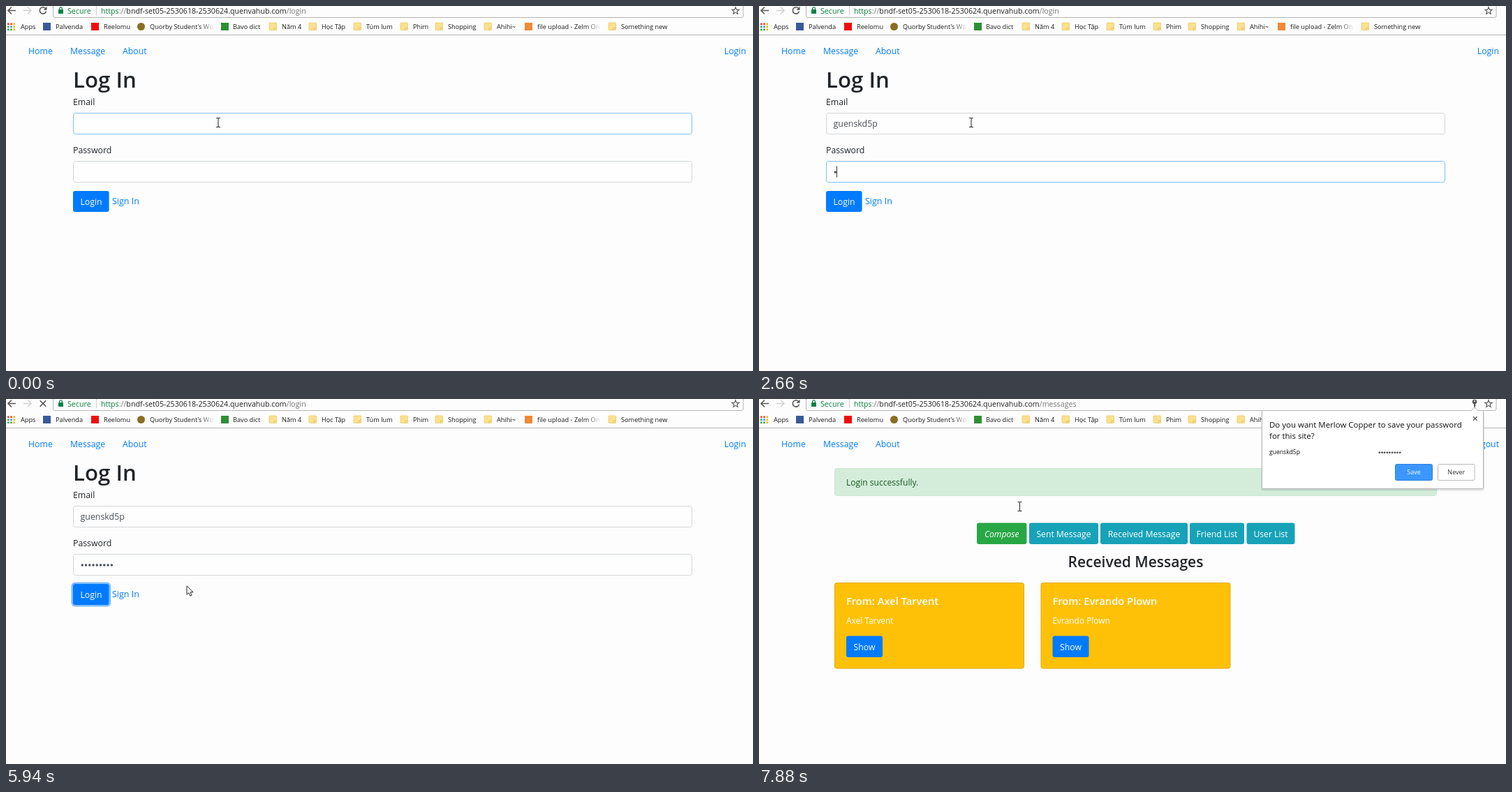
An HTML page that plays this animation: 1070x523 px, repeating every 8000 ms.

```html
<!DOCTYPE html>
<html lang="en">
<head>
<meta charset="utf-8">
<title>Login flow</title>
<style>
  html, body { margin: 0; width: 100%; height: 100%; overflow: hidden; background: #fdfdfd; }
  svg { display: block; width: 1070px; height: 523px; }
  text { font-family: "Open Sans", "Noto Sans", sans-serif; white-space: pre; }
</style>
</head>
<body>
<svg id="stage" viewBox="0 0 1070 523" xmlns="http://www.w3.org/2000/svg"></svg>
<script>
const LOOP = 8000;
const INK = '#212529', LINK = '#007bff', PAPER = '#fdfdfd';
const USER = 'guenskd5p';
const HOST = 'bndf-set05-2530618-2530624.quenvahub.com';
const EMAIL_KEYS = [940, 1020, 1110, 1300, 1390, 1470, 1560, 2020, 2110];
const PASSWORD_KEYS = [2660, 2750, 2840, 2930, 3110, 3200, 3300, 3560, 3760];
const DOT_STEP = 5.27, FIELD_X = 106.5;

// Pointer moves: start, end, number of visible steps, destination, easing power
const MOVES = [
  [4590, 5030, 6, 133, 284, 2.5],
  [5940, 6120, 3, 397, 250, 1.6],
  [6390, 6690, 4, 430, 158, 1.6],
  [6970, 7150, 3, 373.5, 154, 1.6]
];

const text = (x, y, s, fill = INK, size = 12.3, extra = '') =>
  `<text x="${x}" y="${y}" fill="${fill}" font-size="${size}" ${extra}>${s}</text>`;
const rect = (x, y, w, h, fill, extra = '') =>
  `<rect x="${x}" y="${y}" width="${w}" height="${h}" fill="${fill}" ${extra}/>`;
const line = (d, stroke, width = 1, extra = '') =>
  `<path d="${d}" fill="none" stroke="${stroke}" stroke-width="${width}" ${extra}/>`;
const group = (id, body, extra = '') => `<g id="${id}" ${extra}>${body}</g>`;
const button = (x, y, w, label, fill, extra = '') =>
  rect(x, y, w, 30.4, fill, 'rx="3"') +
  text(x + w / 2, y + 20, label, '#fff', 12.2, `text-anchor="middle" ${extra}`);

const fade = (id, x1, x2) =>
  `<linearGradient id="${id}" gradientUnits="userSpaceOnUse" x1="${x1}" x2="${x2}" y1="0" y2="0">
    <stop stop-color="#1c1c1c"/><stop offset="1" stop-color="#1c1c1c" stop-opacity="0"/></linearGradient>`;

const label = (x, s, fill = '#1c1c1c') => text(x, 32.8, s, fill, 9.2);
const folder = (x, s) =>
  `<path d="M${x} 25q0-1 1-1h8.5q1 0 1 1v9.5h-9.5q-1 0-1-1z" fill="#fae08f" stroke="#e9c65c" stroke-width=".7"/>` +
  line(`M${x + 7} 34.5v-3h3.5`, '#e2ba4a', .8) + label(x + 18, s);

function toolbar() {
  const dots = ['#e94235', '#e94235', '#f4b400', '#34a853', '#4285f4', '#f4b400', '#34a853', '#34a853', '#f4b400']
    .map((c, i) => rect(2 + i % 3 * 4.2, 24.5 + Math.floor(i / 3) * 4, 2.6, 2.6, c)).join('');
  const star = Array.from({ length: 10 }, (_, i) => {
    const r = i % 2 ? 2.3 : 5.4, a = i * Math.PI / 5;
    return `${1045 + r * Math.sin(a)},${7 - r * Math.cos(a)}`;
  }).join(' ');
  const folders = [[377, 'Năm 4'], [434, 'Học Tập'], [498, 'Túm lum'], [565, 'Phim'],
    [615, 'Shopping'], [685, 'Ahihi~'], [863, 'Something new']];
  return line('M14 6.5H3M8 1.5l-5 5 5 5', '#5a5a5a', 1.6) +
    line('M25 6.5h11M31 1.5l5 5-5 5', '#d2d2d2', 1.6) +
    group('reload', line('M56.4 3.2A4.7 4.7 0 1 0 57.5 7.6', '#555', 1.6) +
      '<path d="M58.5 .8v5h-5z" fill="#555"/>') +
    group('stop', line('M48.7 2.2l8.6 8.6M57.3 2.2l-8.6 8.6', '#555', 1.6)) +
    line('M67.5 0V14q0 2.5 2.5 2.5H1053.5q2.5 0 2.5-2.5V0', '#b4b4b4') +
    rect(75, 5, 7, 6, '#0b8043', 'rx=".6"') + line('M76.6 5.5V3.7a1.9 1.9 0 0 1 3.8 0V5.5', '#0b8043', 1.2) +
    text(88, 10.5, 'Secure', '#0b8043', 10.7) + line('M129.5 0V13', '#cfcfcf') +
    text(136, 10.5, `<tspan fill="#0b8043">https</tspan><tspan fill="#777">://</tspan>${HOST}<tspan id="path" fill="#777"></tspan>`, '#222', 10.67) +
    `<polygon points="${star}" fill="none" stroke="#555" stroke-width="1.1"/>` +
    group('key', '<circle cx="1025" cy="4" r="3.2" fill="#555"/><circle cx="1025" cy="3" r="1" fill="#fff"/>' +
      rect(1024, 6, 2.2, 5.5, '#555')) +
    dots + label(21, 'Apps') +
    rect(53, 24, 11, 11, '#3b5998') + label(71, 'Palvenda') +
    rect(122, 24, 11, 11, '#f00d0d') + label(140, 'Reelomu') +
    '<circle cx="193.5" cy="29.5" r="5.5" fill="#8a6d23"/>' + label(206, "Quorby Student's Word", 'url(#fadeA)') +
    rect(308, 24, 11, 11, '#2f8f35') + label(325, 'Bavo dict') +
    rect(743, 24, 11, 11, '#ef8a35') + label(761, 'file upload - Zelm On', 'url(#fadeB)') +
    folders.map(f => folder(...f)).join('') +
    line('M0 41.5H1070', '#b6b6b6');
}

const field = (id, y) =>
  rect(96.5, y, 886, 30, '#fff', `id="${id}" rx="3" fill-opacity=".4"`);

function loginPage() {
  const dots = PASSWORD_KEYS.map((_, i) =>
    `<circle class="dot" cx="${109.2 + i * DOT_STEP}" cy="238" r="1.75" fill="#495057"/>`).join('');
  return text(1060, 69, 'Login', LINK, 12.3, 'text-anchor="end"') +
    text(96, 116.5, 'Log In', INK, 31.2, 'font-weight="600"') +
    text(96, 142, 'Email') + field('email', 153.5) +
    text(FIELD_X, 173, '', '#495057', 12.4, 'id="typed"') +
    text(96, 211, 'Password') + field('password', 222.5) + dots +
    rect(0, 0, 1, 16, '#333', 'id="caret"') +
    rect(94.7, 263.7, 54.2, 32.6, 'none', 'id="ring" rx="4.5" stroke="#80bdff" stroke-width="2.6"') +
    rect(96, 265, 51.6, 30, LINK, 'id="submit" rx="3"') +
    text(122, 285, 'Login', '#fff', 12.3, 'text-anchor="middle"') +
    text(152, 284, 'Sign In', LINK, 12.5);
}

const card = (x, name) =>
  rect(x + .5, 263.5, 271, 122.5, '#ffc107', 'rx="3" stroke="#dfa906"') +
  text(x + 17, 295, `From: ${name}`, '#fff', 14.7, 'font-weight="600"') +
  text(x + 17, 322, name, '#fff', 11.9) + button(x + 17, 339.5, 52, 'Show', LINK);

function inboxPage() {
  const tabs = [[387, 99, 'Sent Message'], [489, 125, 'Received Message'], [617, 78, 'Friend List'], [698.5, 69, 'User List']];
  return text(870, 69, '3', '#333') + text(902, 69, 'Nellie Torvadine', '#333') +
    text(1060, 69, 'Logout', LINK, 12.3, 'text-anchor="end"') +
    rect(108.5, 99.5, 862, 39, '#d4edda', 'rx="3" stroke="#c9e8d1"') +
    text(125, 124, 'Login successfully.', '#155724', 12.1) +
    line('M943.3 117.3l8 8M951.3 117.3l-8 8', '#7f9a88', 1.7) +
    button(312, 177.5, 71.5, 'Compose', '#28a745', 'font-style="italic"') +
    tabs.map(([x, w, s]) => button(x, 177.5, w, s, '#17a2b8')).join('') +
    text(539.5, 241, 'Received Messages', INK, 21, 'font-weight="600" text-anchor="middle"') +
    card(108, 'Axel Tarvent') + card(403.5, 'Evrando Plown');
}

function savePrompt() {
  return rect(719.5, 17.5, 319.5, 114, '#000', 'rx="3" opacity=".1"') +
    rect(720.5, 16.5, 317, 112, '#fff', 'rx="2" stroke="#b5b5b5"') +
    '<path d="M1019.5 17l5.5-5 5.5 5" fill="#fff" stroke="#b5b5b5"/>' +
    text(731, 41, 'Do you want Merlow Copper to save your password', '#111', 11.47) +
    text(731, 56.5, 'for this site?', '#111', 11.47) +
    line('M1023 25.3l5.6 5.6M1028.6 25.3l-5.6 5.6', '#555', 1.3) +
    text(731, 79, USER, '#111', 8.6) +
    text(887, 80.5, '*********', '#111', 9.4, 'style="font-family:\'Liberation Sans\',sans-serif"') +
    rect(911.5, 93.5, 53, 23, '#3b97fd', 'rx="2" stroke="#2f7fdc"') +
    text(938, 108, 'Save', '#fff', 9, 'text-anchor="middle"') +
    rect(972.5, 93.5, 52.5, 23, '#fff', 'rx="2" stroke="#b8b8b8"') +
    text(998.8, 108, 'Never', '#333', 9, 'text-anchor="middle"');
}

const stage = document.getElementById('stage');
stage.innerHTML = `<defs>${fade('fadeA', 278, 299)}${fade('fadeB', 832, 853)}</defs>` +
  rect(0, 0, 1070, 523, PAPER) + toolbar() +
  text(32, 69, 'Home', LINK) + text(92, 69, 'Message', LINK) + text(167, 69, 'About', LINK) +
  group('login', loginPage()) + group('inbox', inboxPage()) + group('prompt', savePrompt()) +
  group('ibeam', line('M-3 -6.5h2q1 0 1 1v11q0 1-1 1h-2M3 -6.5h-2q-1 0-1 1M3 6.5h-2q-1 0-1-1', '#333', 1.1)) +
  group('arrow', '<path d="M0 0V12.5l2.9-2.7 2 4.6 2.2-.9-2-4.5h4z" fill="#fff" stroke="#111" stroke-width=".9"/>');

const el = {};
stage.querySelectorAll('[id]').forEach(node => el[node.id] = node);
const dots = [...stage.querySelectorAll('.dot')];

const show = (node, on) => node.setAttribute('display', on ? 'inline' : 'none');
const set = (node, attrs) => { for (const k in attrs) node.setAttribute(k, attrs[k]); };
const count = (times, t) => times.filter(x => t >= x).length;
const within = (t, a, b) => t >= a && t < b;

function pointerAt(t) {
  let x = 304, y = 167;
  for (const [start, end, steps, toX, toY, power] of MOVES) {
    if (t < start) break;
    const step = Math.min(steps, Math.floor((t - start) / (end - start) * (steps - 1)) + 1);
    const k = 1 - Math.pow(1 - step / steps, power);
    x += (toX - x) * k;
    y += (toY - y) * k;
  }
  return [x, y];
}

function render(t) {
  const arrived = t >= 7700;
  show(el.login, !arrived);
  show(el.inbox, arrived);
  show(el.key, arrived);

  const loading = within(t, 5390, 7790);
  show(el.stop, loading);
  show(el.reload, !loading);
  el.path.textContent = t >= 7060 ? '/messages' : '/login';

  el.typed.textContent = USER.slice(0, count(EMAIL_KEYS, t));
  const hidden = count(PASSWORD_KEYS, t);
  dots.forEach((dot, i) => show(dot, i < hidden));

  const mixed = '#a7c9ed', focused = '#80bdff', idle = '#d3d7db';
  el.email.setAttribute('stroke', t < 2390 ? focused : t < 2480 ? mixed : idle);
  el.password.setAttribute('stroke', t < 2390 ? idle : t < 2480 ? mixed : t < 5310 ? focused : t < 5390 ? mixed : idle);

  const inEmail = t < 2390;
  show(el.caret, within(t, 570, 2390) || within(t, 2480, 4210) || within(t, 4770, 5310));
  set(el.caret, {
    x: Math.round(FIELD_X - .5 + (inEmail ? el.typed.getComputedTextLength() : hidden * DOT_STEP)),
    y: inEmail ? 160.5 : 229.5
  });

  el.submit.setAttribute('fill', within(t, 5030, 5940) ? '#0069d9' : within(t, 4940, 5030) ? '#0071eb' : LINK);
  show(el.ring, t >= 5310 && !arrived);
  el.ring.setAttribute('opacity', t < 5390 ? .5 : 1);

  show(el.prompt, arrived);
  const [alpha, scale] = t < 7790 ? [.1, .953] : t < 7880 ? [.65, .985] : [1, 1];
  set(el.prompt, { opacity: alpha, transform: `translate(871 72) scale(${scale}) translate(-871 -72)` });

  const [x, y] = pointerAt(t);
  const overField = within(y, 153, 184) || within(y, 222, 253);
  show(el.ibeam, overField);
  show(el.arrow, !overField);
  set(overField ? el.ibeam : el.arrow, { transform: `translate(${x.toFixed(1)} ${y.toFixed(1)})` });
}

const begun = performance.now();
function tick() {
  render((performance.now() - begun) % LOOP);
  requestAnimationFrame(tick);
}
tick();
</script>
</body>
</html>
```
